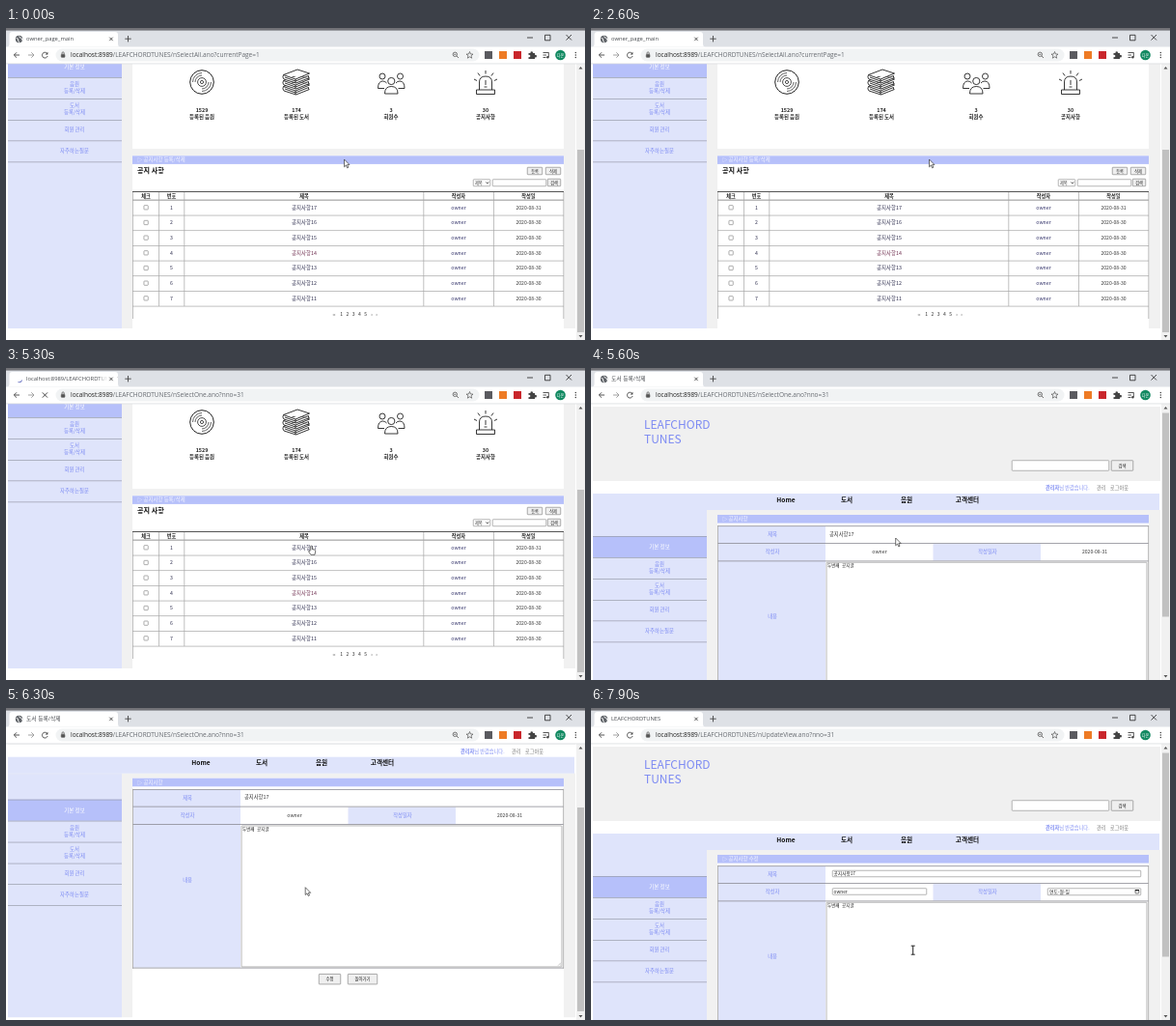
Write an HTML page that moves like this. It is 600 px wide and 323 px high and loops after 8000 ms.

```html
<!DOCTYPE html>
<html>
<head>
<meta charset="utf-8">
<style>
html, body { margin: 0; width: 100%; height: 100%; overflow: hidden; background: #fff }
svg { display: block; width: 600px; height: 323px; font-family: 'Noto Sans CJK KR', 'Noto Sans CJK', sans-serif }
.ui { font-family: 'Open Sans', 'Noto Sans CJK KR', sans-serif }
.mono { font-family: 'Noto Sans Mono', 'Noto Sans CJK KR', monospace }
</style>
</head>
<body>
<svg id="stage" viewBox="0 0 600 323"></svg>
<script>
const SITE = 'LEAFCHORD', SITE2 = 'TUNES', USER = 'owner';
const PALE = '#dfe4fb', BLUE = '#b6c0fa', INK = '#7d8bf3', GREY = '#f1f1f1', LINE = '#a6a6a6';

// Markup helpers; text is placed by its vertical middle.
const rect = (x, y, w, h, fill, more = '') => `<rect x="${x}" y="${y}" width="${w}" height="${h}" fill="${fill}" ${more}/>`;
const box = (x, y, w, h, fill = '#fff', stroke = '#858585') =>
  rect(x + .25, y + .25, w - .5, h - .5, fill, `stroke="${stroke}" stroke-width=".6" rx=".6"`);
const text = (x, y, s, size = 5.3, fill = '#333', more = '') =>
  `<text x="${x}" y="${y + size * .36}" font-size="${size}" fill="${fill}" ${more}>${s}</text>`;
const MID = 'text-anchor="middle"', BOLD = 'font-weight="700"';
const mid = (x, y, s, size, fill, more = '') => text(x, y, s, size, fill, MID + ' ' + more);
const path = (d, stroke = '#333', w = .9, more = '') =>
  `<path d="${d}" fill="none" stroke="${stroke}" stroke-width="${w}" ${more}/>`;
const ring = (x, y, r, w = .8, stroke = '#222') => `<circle cx="${x}" cy="${y}" r="${r}" fill="none" stroke="${stroke}" stroke-width="${w}"/>`;
const dot = (x, y, r, fill) => `<circle cx="${x}" cy="${y}" r="${r}" fill="${fill}"/>`;
const group = (id, s, more = '') => `<g id="${id}" ${more}>${s}</g>`;
const button = (x, y, w, h, s, size = 4.2) =>
  box(x, y, w, h, '#efefef', '#777') + mid(x + w / 2, y + h / 2, s, size, '#222');
const heading = (y, s, id = '') =>
  rect(131, y, 447, 8.6, BLUE) + text(136, y + 4.2, s, 5.4, '#f5f6ff', id && `id="${id}"`);

function siteFrame() {
  let s = rect(2, 40, 588, 77, '#f0f0f0') + group('body', rect(2, 147, 588, 1, GREY) + rect(2, 147, 118, 1, PALE));
  s += rect(2, 130, 587, 17, PALE);
  s += text(55, 59, SITE, 12, INK) + text(55, 74, SITE2, 12, INK);
  s += box(436, 95.5, 101, 11) + button(539, 95.5, 23, 11, '검색', 4.4);
  s += text(471, 124, `<tspan ${BOLD}>관리자</tspan>님 반갑습니다.`, 5.2, INK);
  s += text(524, 124, '관리', 5.2, '#777') + text(538, 124, '로그아웃', 5.2, '#777');
  [['Home', 202], ['도서', 265], ['음원', 327], ['고객센터', 390]]
    .forEach(([n, x]) => s += mid(x, 136.3, n, 6.6, '#111', BOLD));
  s += rect(2, 174, 118, 22, BLUE) + mid(71, 185, '기본 정보', 5.5, '#fff');
  [[174], [196], [218], [240], [261.5], [283.5]].forEach(([y]) => s += rect(2, y, 118, .7, '#999cab'));
  [['음원', 203.5], ['등록/삭제', 210.5], ['도서', 225.3], ['등록/삭제', 232.3], ['회원 관리', 250.3], ['자주하는질문', 272]]
    .forEach(([n, y]) => s += mid(71, y, n, 5.4, INK));
  return s;
}

function icons() {
  let s = ring(203, 56, 12.3, 1) + ring(203, 56, 4.4) + ring(203, 56, 1.6);
  for (const r of [7, 9.5])
    s += path(`M${203 - r} 56A${r} ${r} 0 0 1 203 ${56 - r}M${203 + r} 56A${r} ${r} 0 0 1 203 ${56 + r}`, '#222', .7);
  for (const y of [60.5, 54.5, 48.5])
    s += `<path d="M287.5 ${y}L302 ${y - 5.5} 314.5 ${y - 1.5} 300 ${y + 4.5}ZM287.5 ${y}Q286 ${y + 2.5} 288 ${y + 4.5}L300.5 ${y + 8.5} 314.5 ${y + 3}M300 ${y + 4.5}V${y + 8.5}M289 ${y + 2.5}L300 ${y + 6.5} 313.5 ${y + 1}V${y + 3}" fill="#fff" stroke="#222" stroke-width=".9"/>`;
  for (const [x, y, r] of [[390, 50, 3], [408.5, 50, 3], [399.3, 55, 3.6]])
    s += ring(x, y, r, .9);
  s += path('M392.5 68Q392.5 60.5 399.3 60.5T406 68ZM385.5 62.5Q385.5 55 390.5 55 393 55 394.5 57M385.5 62.5H392M413 62.5Q413 55 408 55 405.5 55 404 57M413 62.5H406.5', '#222');
  s += path('M490.5 64V56Q490.5 50 497 50T503.5 56V64M487.5 64H506.5V68.5H487.5ZM497 54V59M495.5 61H498.5M497 44V47.5M489 46.5L491 49.5M505 46.5L503 49.5M485 53L488 54.5M509 53L506 54.5', '#222');
  return s;
}

function listPage() {
  let s = rect(131, 37, 447, 88, '#fff') + icons() + rect(131, 132, 447, 179, '#fff');
  [[203, 1529, '등록된 음원'], [301, 174, '등록된 도서'], [399, 3, '회원수'], [497, 30, '공지사항']]
    .forEach(([x, n, label]) => s += mid(x, 84.7, n, 5.4, '#222', BOLD) + mid(x, 91.7, label, 5.4, '#222', BOLD));
  s += heading(132.3, '▷ 공지사항 등록/삭제') + text(136, 147.5, '공지 사항', 7.1, '#111', BOLD);
  s += button(540, 144, 16, 8, '등록') + button(559, 144, 16, 8, '삭제');
  s += box(484, 156.5, 18, 7.5) + text(486, 160.3, '제목', 4.2) + path('M497.3 159.5L498.8 161 500.3 159.5', '#222', .8);
  s += box(504, 156.5, 56, 7.5) + button(561, 156, 14, 8, '검색');
  s += rect(131, 169, 447, 1, '#555');
  ['체크', '번호', '제목', '작성자', '작성일'].forEach((n, i) =>
    s += mid([145, 171.5, 309, 469, 541.5][i], 174.1, n, 5.2, '#222', BOLD));
  s += rect(131, 177.7, 447, .8, '#777');
  for (let i = 0; i < 7; i++) {
    const y = 185.8 + i * 15.67;
    s += box(142.7, y - 2.4, 4.8, 4.8, '#fff', '#777') + mid(171.5, y, i + 1, 5.2, '#303050');
    s += mid(309, y, '공지사항' + (17 - i), 5.4, i == 3 ? '#703050' : '#303050');
    s += mid(469, y, USER, 5.2, '#303068') + mid(541.5, y, i ? '2020-08-30' : '2020-08-31', 5.1, '#333');
    s += rect(131, y + 7.9, 447, .7, LINE);
  }
  [158, 184.5, 432.5, 505].forEach(x => s += rect(x, 170, .7, 118, LINE));
  s += rect(131, 170, .7, 131, LINE) + rect(577.5, 170, .7, 131, LINE);
  ['‹‹', 1, 2, 3, 4, 5, '›', '›'].forEach((c, i) =>
    s += mid([340, 347.7, 354, 360.2, 366.4, 372.6, 379, 384][i], 296.6, c, 5.1, '#333'));
  return s;
}

function noticePage() {
  let s = rect(131, 152, 447, 250, '#fff') + heading(152, '', 'pageHead');
  s += rect(132, 164, 111, 184, PALE) + rect(354.5, 182, 111.5, 17.5, PALE);
  [163.3, 181, 199.5, 348].forEach(y => s += rect(131, y, 447, .8, '#8e8e96'));
  s += rect(131, 163, .8, 186, LINE) + rect(577.3, 163, .8, 186, LINE);
  [[188, 172, '제목'], [188, 190.3, '작성자'], [411, 190.3, '작성일자'], [188, 257.3, '내용']]
    .forEach(([x, y, n]) => s += mid(x, y, n, 5.3, INK));
  s += box(243.8, 201, 332.4, 146.5, '#fff', '#888') + text(245, 204.3, '두번째 공지글', 4.5, '#222', 'class="mono"');
  s += path('M572 346L575 343M573.8 346L575 344.8', '#999', .5);
  s += group('view', text(247, 171.8, '공지사항17', 5.3) + mid(299, 190.3, USER, 5.2) + mid(522, 190.3, '2020-08-31', 5.1));
  s += group('edit',
    box(250, 168, 320, 7) + text(251.5, 171.5, '공지사항17', 4.7, '#222') +
    box(250, 186.5, 98, 7) + text(251.5, 189.8, USER, 4.8, '#222') +
    box(473, 186.5, 97, 7.5) + text(475, 190, '연도-월-일', 4.8, '#222') +
    box(563.8, 188.2, 4.2, 4, '#fff', '#222') + rect(563.8, 188, 4.2, 1.3, '#222'));
  s += group('actions', button(324, 354.5, 23, 11, '수정', 4.4) + button(354, 354.5, 31, 11, '돌아가기', 4.4));
  return s;
}

function browser() {
  let s = rect(0, 0, 600, 37, '#fff') + rect(0, 0, 600, 19.5, '#dee1e6') + rect(0, 0, 600, 2.6, '#737378');
  s += '<path d="M1 19.5Q3.5 19.5 3.5 16V7Q3.5 4 6.5 4H113Q116 4 116 7V16Q116 19.5 118.5 19.5Z" fill="#fff"/>';
  s += group('globe', dot(13.5, 11.5, 3.7, '#5f6368') + path('M10.7 10.5Q13 10.8 12.5 12.3T14 14.5M13.5 8.6Q13.8 10 15.5 10.3T16.5 12.5', '#fff', 1));
  s += group('spinner', path('M13.5 8.3A3.2 3.2 0 0 1 16.7 11.5', '#7a80c8', 1));
  s += text(21, 11.2, '', 5.8, '#45484d', 'id="tabTitle" class="ui"') + rect(95, 6, 20.5, 11, 'url(#fade)');
  s += path('M107.3 9.7L110.7 13.1M110.7 9.7L107.3 13.1M126.5 8V14.4M123.3 11.2H129.7', '#444', .9);
  s += path('M540 10H546M558.5 7.3H564V12.8H558.5ZM580.5 7L586 12.5M586 7L580.5 12.5', '#222', .8);
  s += path('M14 28H8.3M11 25.3L8.3 28 11 30.7', '#444') + path('M23 28H29M26.3 25.3L29 28 26.3 30.7', '#999');
  s += group('reload', path('M42.6 26.3A2.9 2.9 0 1 0 43.1 29', '#444') + '<path d="M43.4 24.8V27.6H40.6Z" fill="#444"/>');
  s += group('stop', path('M37.8 25.4L43 30.6M43 25.4L37.8 30.6', '#444', 1));
  s += rect(51.5, 21.5, 439, 13, '#f1f3f4', 'rx="6.5"');
  s += box(57, 27, 4.2, 3.6, '#555', '#555') + path('M58 27V26Q58 24.8 59.1 24.8T60.2 26V27', '#555', .7);
  s += text(67, 28, '', 6.5, '#666a70', 'id="url" class="ui"');
  s += ring(465.3, 27.3, 2.2, .8, '#555') + path('M467 29L469 31M464.2 27.3H466.4', '#555', .8);
  s += path('M480.5 24.5L481.5 27 484 27.1 482 28.7 482.7 31.2 480.5 29.8 478.3 31.2 479 28.7 477 27.1 479.5 27Z', '#555', .7);
  s += rect(496, 24, 8, 8, '#5b5b60') + rect(511, 24, 8, 8, '#ee7b25') + rect(526, 24, 8, 8, '#c9262c');
  s += '<path d="M541.5 26H543.5A1.3 1.3 0 1 1 546 26H548V28A1.3 1.3 0 1 1 548 30.2V32H541.5V30A1.2 1.2 0 1 0 541.5 28Z" fill="#444"/>';
  s += path('M556.5 25.5H562.5M556.5 28H560M556.5 30.5H559.5M562.3 25.5V30', '#444', .9) + dot(561.4, 30.2, 1.2, '#444');
  s += dot(574.5, 28, 5.3, '#128a62') + mid(574.5, 28, '다온', 4.2, '#fff');
  [25.5, 28, 30.5].forEach(y => s += dot(590.3, y, .75, '#444'));
  return s + rect(0, 36.6, 600, .7, '#d5d7da');
}

const bar = rect(591, 37, 9, 286, '#f1f1f1') + rect(592, 46, 7, 200, '#c1c1c1', 'id="thumb"') +
  '<path d="M593.5 42.5L595.5 40 597.5 42.5ZM593.5 318L595.5 320.5 597.5 318Z" fill="#555"/>';

const shapes = {
  arrow: '<path d="M0 0V7.8L1.8 6.1 3.1 8.9 4.3 8.3 3.1 5.6H5.5Z" fill="#fff" stroke="#333" stroke-width=".7"/>',
  hand: '<path d="M-.8 4.8V.8Q0-.5.8.8V3.6L3.5 4.2Q4.4 4.6 4.2 5.8L3.5 9.3H-.6L-3 6Q-2.8 4.8-1.6 5.6Z" fill="#fff" stroke="#333" stroke-width=".7"/>',
  beam: path('M-2-4.5H2M0-4.5V4.5M-2 4.5H2', '#222', 1)
};

stage.innerHTML = `<defs><linearGradient id="fade"><stop stop-color="#fff" stop-opacity="0"/><stop offset=".5" stop-color="#fff"/></linearGradient></defs>` +
  rect(0, 0, 600, 323, '#fff') + rect(2, 37, 588, 0, GREY, 'id="ground"') + rect(2, 37, 118, 0, PALE, 'id="side"') +
  group('site', siteFrame()) + group('list', listPage()) + group('notice', noticePage()) +
  bar + browser() + Object.keys(shapes).map(k => group(k, shapes[k])).join('');

const $ = id => document.getElementById(id);
const show = (id, on) => $(id).setAttribute('display', on ? 'inline' : 'none');
const set = (id, attrs) => { for (const k in attrs) $(id).setAttribute(k, attrs[k]); };
const label = (id, s) => { if ($(id).innerHTML !== s) $(id).innerHTML = s; };
const ease = (t, a, b) => { const p = Math.min(1, Math.max(0, (t - a) / (b - a))); return p * p * (3 - 2 * p); };

// Pointer stops: time, x, y.
const stops = [[0, 350.5, 136], [3700, 350.5, 136], [4150, 316.5, 184], [5350, 316.5, 184], [5550, 315.7, 176],
  [5900, 315.7, 176], [6250, 310.2, 185.7], [6500, 310.2, 185.7], [7150, 339.5, 285.5], [7650, 339.5, 285.5], [7850, 333.7, 250.7], [8000, 333.7, 250.7]];

function pointer(t) {
  const i = Math.max(1, stops.findIndex(s => s[0] > t)), a = stops[i - 1], b = stops[i];
  const p = ease(t, a[0], b[0]);
  return [a[1] + (b[1] - a[1]) * p, a[2] + (b[2] - a[2]) * p];
}

function draw(t) {
  const page = t < 5500 ? 0 : t < 7700 ? 1 : 2;
  const loading = t >= 5200 && t < 5500 || t >= 7500 && t < 7700;
  const down = ease(t, 5850, 6250);
  const scroll = [145, 79.3 * down, 0][page];
  const top = Math.max(37, 147 - scroll), end = page ? 399.5 - scroll : 311;

  set('ground', { y: top, height: end - top });
  set('side', { y: top, height: end - top });
  set('site', { transform: `translate(0 ${-scroll})` });
  set('notice', { transform: `translate(0 ${-scroll})` });
  set('thumb', page ? { y: 46.5 + 56.5 * (page == 1 ? down : 0), height: 211 } : { y: 126, height: 189 });
  show('list', page == 0);
  show('notice', page > 0);
  show('view', page == 1);
  show('edit', page == 2);
  label('pageHead', page == 2 ? '▷ 공지사항 수정' : '▷ 공지사항');
  set('actions', {});
  const hot = page == 1 && t > 7050;
  $('actions').firstChild.setAttribute('fill', hot ? '#d9d9d9' : '#efefef');
  $('actions').firstChild.setAttribute('stroke', hot ? '#444' : '#777');

  const path = ['nSelectAll.ano?currentPage=1', 'nSelectOne.ano?nno=31', 'nUpdateView.ano?nno=31'][(t >= 5200) + (t >= 7500)];
  label('url', `<tspan fill="#222">localhost:8989</tspan>/${SITE + SITE2}/${path}`);
  label('tabTitle', loading ? `localhost:8989/${SITE + SITE2}/` : [USER + '_page_main', '도서 등록/삭제', SITE + SITE2][page]);
  show('globe', !loading);
  show('reload', !loading);
  show('spinner', loading);
  show('stop', loading);
  set('spinner', { transform: `rotate(${t * .36 % 360} 13.5 11.5)` });

  const [x, y] = pointer(t);
  const kind = t >= 7200 ? 'beam' : t >= 4050 && t < 5500 ? 'hand' : 'arrow';
  for (const k in shapes) show(k, k == kind);
  set(kind, { transform: `translate(${x} ${y})` });
}

const start = performance.now();
function tick() {
  draw((performance.now() - start) % 8000);
  requestAnimationFrame(tick);
}
tick();
</script>
</body>
</html>
```
